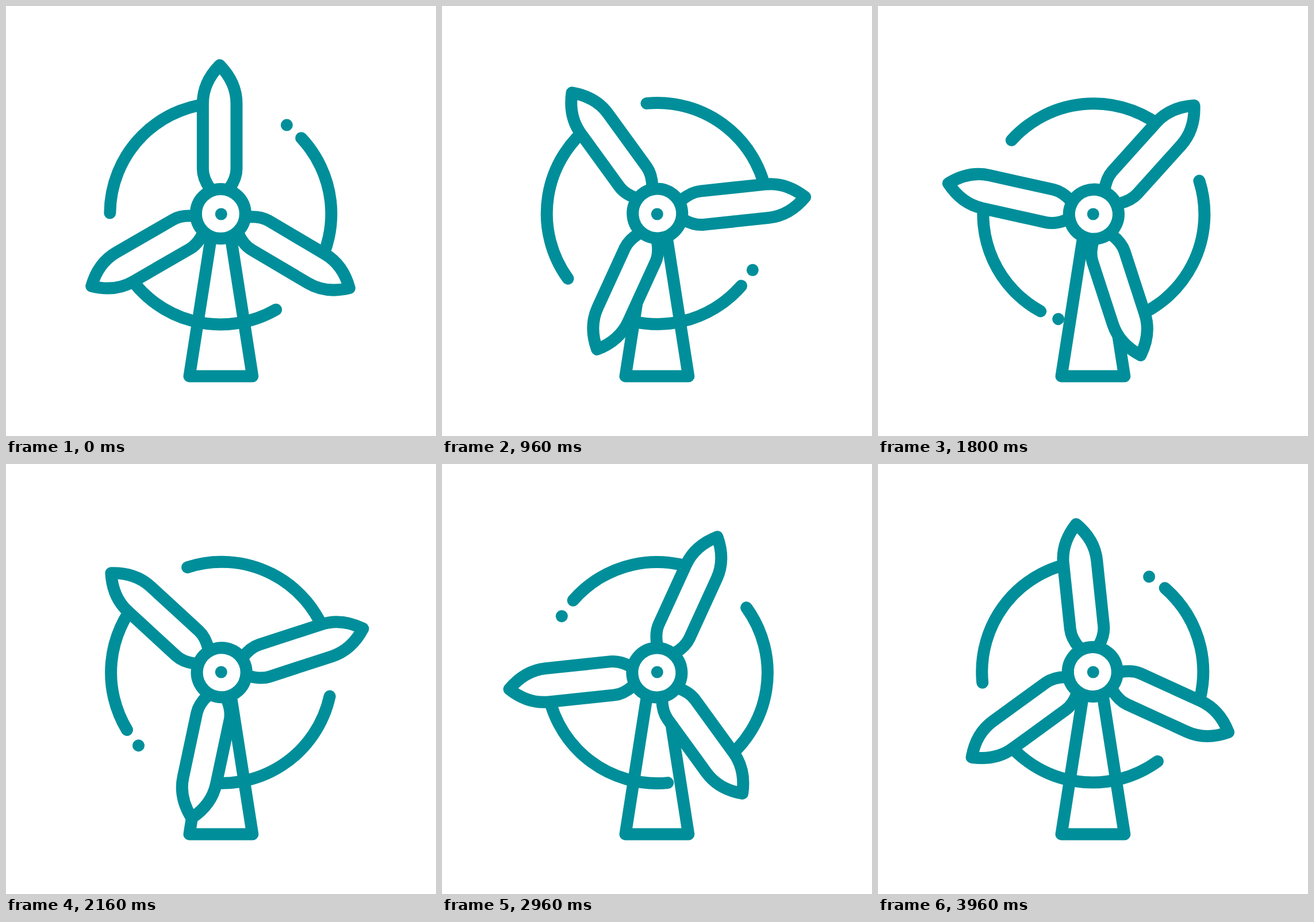
These frames come from a looping animation (748x748 px, 4000 ms). An HTML page:

```html
<!DOCTYPE html>
<html lang="en">
<head>
<meta charset="utf-8">
<title>Wind turbine</title>
<style>
  html, body { margin: 0; width: 100%; height: 100%; overflow: hidden; background: #fff; }
  svg { display: block; width: 100%; height: 100%; }
</style>
</head>
<body>
<svg viewBox="0 0 748 748" fill="none" stroke="#008f9a" stroke-width="21" stroke-linecap="round" stroke-linejoin="round">
  <path d="M356.5 404 319 644H428.8L391.3 404" stroke-linecap="butt"/>
  <g id="rotor">
    <g id="ring" transform="translate(-.95 -.55)"></g>
    <g id="blades" fill="#fff" stroke-linecap="butt"></g>
    <circle cx="-.95" cy="-.55" r="43" fill="#fff"/>
  </g>
  <circle cx="374.3" cy="362" r="10.5" fill="#008f9a" stroke="none"/>
</svg>
<script>
  const LOOP = 4000, STEPS = 60, RADIUS = 192.5;
  const rotor = document.getElementById('rotor');
  const ring = document.getElementById('ring');
  const blades = document.getElementById('blades');

  function addPath(parent, d, transform = '') {
    const path = document.createElementNS(parent.namespaceURI, 'path');
    path.setAttribute('d', d);
    path.setAttribute('transform', transform);
    parent.append(path);
  }

  // Angles run clockwise from the top.
  function onRing(degrees) {
    const a = degrees * Math.PI / 180;
    return `${RADIUS * Math.sin(a)} ${-RADIUS * Math.cos(a)}`;
  }

  for (const [from, to] of [[270.4, 360], [46.8, 120], [150, 240]])
    addPath(ring, `M${onRing(from)}A${RADIUS} ${RADIUS} 0 0 1 ${onRing(to)}`);
  addPath(ring, `M${onRing(36.7)}h.01`);

  // The blades sit slightly off the axis: angle, sideways and lengthwise shift.
  const bladeShape = 'M-17-44Q-29.3-62-29.3-78V-192C-29.3-217-18-240 0-258.5' +
    'C18-240 29.3-217 29.3-192V-78Q29.3-62 17-44';
  for (const [angle, x, y] of [[0, -2.6, -.5], [120.6, -2.8, 1], [240, 4.2, .5]])
    addPath(blades, bladeShape, `rotate(${angle}) translate(${x} ${y})`);

  function draw() {
    // The small bias keeps exact step times from rounding down.
    const step = Math.floor(performance.now() % LOOP / LOOP * STEPS + .05) % STEPS;
    rotor.setAttribute('transform', `translate(374.3 362) rotate(${step * 360 / STEPS})`);
    requestAnimationFrame(draw);
  }
  draw();
</script>
</body>
</html>
```
